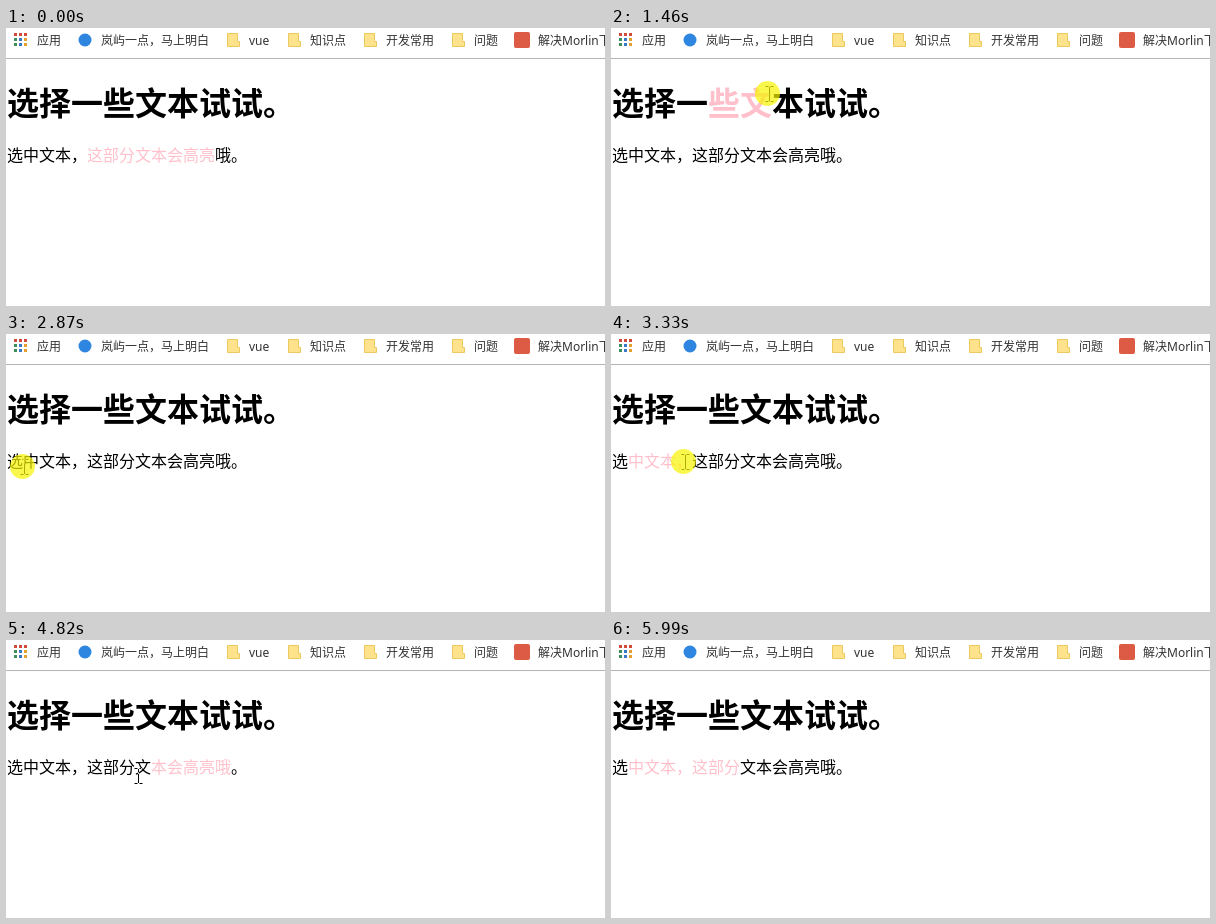
An HTML page that plays this animation: 599 px wide and 278 px high, repeating every 6650 ms.

```html
<!DOCTYPE html>
<html lang="zh-CN">
<head>
<meta charset="utf-8">
<title>文本选择</title>
<style>
  html, body { margin: 0; width: 100%; height: 100%; overflow: hidden; background: #fff; }
  svg { display: block; background: #fff; font-family: "Noto Sans CJK SC", "Noto Sans CJK", sans-serif; }
  #bar text { font: 12px "Noto Sans", "Noto Sans CJK SC", "Noto Sans CJK", sans-serif; fill: #333; }
  #beam { fill: none; stroke: #fff; mix-blend-mode: difference; }
  #halo { fill: #f8f400; opacity: .7; }
  .on { fill: pink; }
</style>
</head>
<body>
<svg width="599" height="278" viewBox="0 0 599 278">
  <g id="bar">
    <path d="M0 30.5H599" stroke="#b4b4b4"/>
    <circle cx="79" cy="12" r="6.5" fill="#2f86e0"/>
    <rect x="508" y="4" width="16" height="16" rx="2" fill="#dd5b44"/>
  </g>
  <text class="line" y="87" font-size="32" font-weight="700"></text>
  <text class="line" y="133" font-size="16"></text>
  <path id="beam" d="M-4-7.5H-1M1-7.5H4M0-7V7M-4 7.5H-1M1 7.5H4"/>
  <circle id="halo" r="12.5"/>
  <path id="arrow" d="M0 0V16L4 12.5L6.5 18L9 17L6.5 11.5H11.5Z" fill="#fff" stroke="#000"/>
</svg>
<script>
const LOOP = 6650;
const $ = id => document.getElementById(id);

function add(parent, tag, attrs, text = '') {
  const el = document.createElementNS('http://www.w3.org/2000/svg', tag);
  for (const k in attrs) el.setAttribute(k, attrs[k]);
  el.textContent = text;
  return parent.appendChild(el);
}

// Bookmarks bar
const labels = { 应用: 31, '岚屿一点，马上明白': 95, vue: 243, 知识点: 304, 开发常用: 380, 问题: 468, 解决Morlin下载: 532 };
for (const label in labels) {
  add($('bar'), 'text', { x: labels[label], y: 17 }, label);
}
for (const label of ['vue', '知识点', '开发常用', '问题']) {
  const x = labels[label] - 21.5;
  add($('bar'), 'path', { d: `M${x} 5.5h10v8h2v5h-12z`, fill: '#ffe28c', stroke: '#ecc95c' });
}
const [red, green, blue, gold] = ['#d24a3c', '#3c8f5a', '#3a78c8', '#e3a02d'];
[red, red, red, green, blue, gold, green, blue, gold].forEach((fill, i) =>
  add($('bar'), 'rect', { x: 8 + i % 3 * 5, y: 5 + Math.floor(i / 3) * 5, width: 3, height: 3, fill }));

// Selectable lines, one tspan per character
const sizes = [32, 16];
const lines = ['选择一些文本试试。', '选中文本，这部分文本会高亮哦。'].map((s, n) => {
  const el = document.querySelectorAll('.line')[n];
  return [...s].map((c, i) => add(el, 'tspan', { x: 1 + i * sizes[n] }, c));
});

// Pointer stops; "row" means the button goes down here and is held to the next stop
const stops = [
  { t: 210, x: 358, y: 229 },
  { t: 930, x: 90, y: 64, row: 0 },
  { t: 2090, x: 238, y: 68 },
  { t: 2870, x: 18, y: 133, row: 1 },
  { t: 3650, x: 112, y: 124 },
  { t: 3800, x: 154, y: 128 },
  { t: 4230, x: 224, y: 126, row: 1 },
  { t: 4590, x: 146, y: 127 },
  { t: 4820, x: 132, y: 136 },
  { t: 5520, x: 24, y: 131, row: 1 },
  { t: 5820, x: 125, y: 128 },
  { t: 5980, x: 388, y: 278 }
];
const pressed = s => s.row !== undefined;

// Drags are steady, free moves slow down towards their end
function between(a, b, t) {
  const k = Math.min(1, (t - a.t) / (b.t - a.t));
  const e = pressed(a) ? k : 1 - (1 - k) ** 2;
  return { x: Math.round(a.x + (b.x - a.x) * e), y: Math.round(a.y + (b.y - a.y) * e) };
}

function selection(t) {
  const i = stops.findLastIndex(s => s.t <= t && pressed(s));
  if (i < 0) return [1, 5, 13];
  const start = stops[i], row = start.row;
  const index = p => Math.round((p.x - 1) / sizes[row]);
  const ends = [index(start), index(between(start, stops[i + 1], t))];
  return [row, Math.min(...ends), Math.max(...ends)];
}

function place(el, show, x, y) {
  el.setAttribute('visibility', show ? 'visible' : 'hidden');
  el.setAttribute('transform', `translate(${x} ${y})`);
}

function draw(t) {
  const [row, from, to] = selection(t);
  lines.forEach((chars, n) => chars.forEach((c, i) =>
    c.setAttribute('class', n === row && i >= from && i < to ? 'on' : '')));

  const i = stops.findLastIndex(s => s.t <= t);
  const shown = i >= 0 && i < stops.length - 1;
  const { x, y } = shown ? between(stops[i], stops[i + 1], t) : stops[0];
  const down = shown && pressed(stops[i]);
  const overText = (y > 54 && y < 97 && x < 289) || (y > 116 && y < 140 && x < 241);
  place($('halo'), down, x - 1.5, y - .5);
  place($('beam'), shown && (down || overText), x + .5, y);
  place($('arrow'), shown && !down && !overText, x + .5, y + .5);
}

function frame() {
  draw(performance.now() % LOOP);
  requestAnimationFrame(frame);
}
frame();
</script>
</body>
</html>
```
